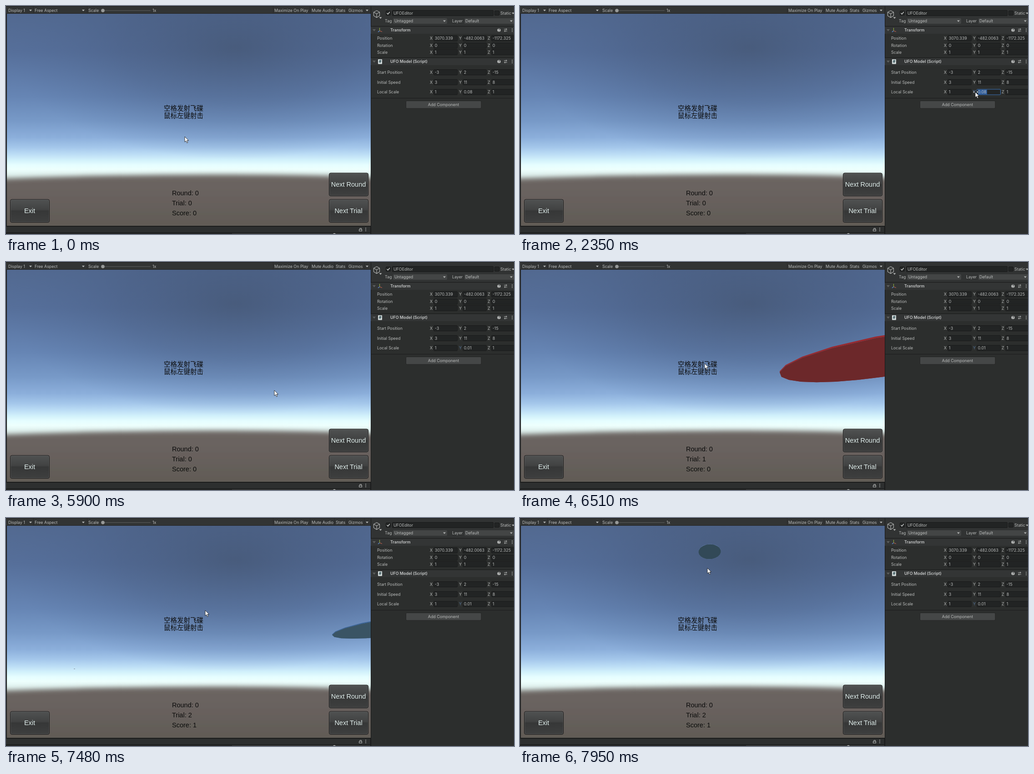
These frames come from a looping animation (1117 px wide and 501 px high, 8000 ms). An HTML page:

```html
<!DOCTYPE html>
<html lang="zh-CN">
<head>
<meta charset="utf-8">
<title>Disc launcher</title>
<style>
html, body { margin: 0; width: 100%; height: 100%; overflow: hidden; background: #2c2e2d; }
svg { display: block; width: 1117px; height: 501px; }
text { white-space: pre; }
.ui { font: 8.9px Inter, Roboto, sans-serif; fill: #b9bbba; }
.bold { font-weight: 600; fill: #c8caca; }
.game { font: 14.5px "Liberation Sans", Arial, sans-serif; fill: #0b0b0b; }
.cjk { font: 14.5px "Noto Sans CJK SC", "Noto Sans CJK", sans-serif; fill: #0b0b0b; }
.btn { fill: #e2f0ee; text-anchor: middle; }
</style>
</head>
<body>
<svg id="stage" viewBox="0 0 1117 501" xmlns="http://www.w3.org/2000/svg">
  <defs>
    <linearGradient id="sky" gradientUnits="userSpaceOnUse" x1="0" y1="17" x2="0" y2="395">
      <stop offset="0" stop-color="#526990"/><stop offset=".22" stop-color="#566f9a"/>
      <stop offset=".48" stop-color="#6685b4"/><stop offset=".62" stop-color="#7799c7"/>
      <stop offset=".72" stop-color="#8cafdb"/><stop offset=".775" stop-color="#a3c6ea"/>
      <stop offset=".815" stop-color="#bbdcf5"/><stop offset=".85" stop-color="#d2f1fb"/>
      <stop offset=".88" stop-color="#e6feff"/><stop offset=".905" stop-color="#edfffd"/>
      <stop offset="1" stop-color="#c6d6d2"/>
    </linearGradient>
    <radialGradient id="dusk" gradientUnits="userSpaceOnUse" cx="0" cy="0" r="1"
      gradientTransform="translate(505 92) scale(500 245)">
      <stop offset="0" stop-color="#42536f" stop-opacity=".68"/>
      <stop offset=".5" stop-color="#465a7e" stop-opacity=".4"/>
      <stop offset="1" stop-color="#4e6894" stop-opacity="0"/>
    </radialGradient>
    <linearGradient id="ground" gradientUnits="userSpaceOnUse" x1="0" y1="370" x2="0" y2="483">
      <stop offset="0" stop-color="#6d6663"/><stop offset="1" stop-color="#615b56"/>
    </linearGradient>
    <linearGradient id="key" x1="0" y1="0" x2="0" y2="1">
      <stop offset="0" stop-color="#505252"/><stop offset=".45" stop-color="#414242"/>
      <stop offset=".5" stop-color="#363737"/><stop offset="1" stop-color="#3e3f3f"/>
    </linearGradient>
    <filter id="soft" x="-10%" y="-20%" width="120%" height="140%"><feGaussianBlur stdDeviation="5.5"/></filter>
    <clipPath id="view"><rect x="2" y="17" width="800" height="466"/></clipPath>
  </defs>
  <g id="scene" clip-path="url(#view)">
    <rect x="2" y="17" width="800" height="466" fill="url(#sky)"/>
    <rect x="2" y="17" width="800" height="466" fill="url(#dusk)"/>
    <path d="M-40 381Q200 371 450 370.500T850 380V520H-40Z" fill="url(#ground)" filter="url(#soft)"/>
    <rect id="speck" x="149" y="331" width="3" height="1" fill="#54505c" opacity=".6"/>
    <g id="discs"></g>
  </g>
  <g id="panel"></g>
  <g id="cursor">
    <path id="arrow" d="M0 0V11.8L2.8 9.3 4.8 13.9 6.8 13 4.8 8.6H8.5Z" fill="#fff" stroke="#111" stroke-width=".8"/>
    <path id="beam" d="M-3 -6.5H-.8L0 -6L.8 -6.5H3M0 -6V6M-3 6.5H-.8L0 6L.8 6.5H3" fill="none" stroke="#ddd"/>
    <path id="grip" d="M-2 -2.5V2.5L-5 0ZM4 -2.5V2.5L7 0Z" fill="#fff" stroke="#111" stroke-width=".6"/>
  </g>
</svg>
<script>
const $ = id => document.getElementById(id);
const rect = (x, y, w, h, fill, more = '') =>
  `<rect x="${x}" y="${y}" width="${w}" height="${h}" fill="${fill}" ${more}/>`;
const text = (x, y, s, cls = 'ui', more = '') => `<text x="${x}" y="${y}" class="${cls}" ${more}>${s}</text>`;
const path = (d, fill, more = '') => `<path d="${d}" fill="${fill}" ${more}/>`;
const down = (x, y) => path(`M${x - 3} ${y - 1.5}h6l-3 3.5z`, '#b4b6b5');
const dots = (x, y) => [-3, 0, 3].map(d => rect(x - .7, y + d - .7, 1.5, 1.5, '#c0c2c1')).join('');
const field = (x, y, w, h = 12, more = '') =>
  rect(x + .5, y + .5, w - 1, h, '#222424', `stroke="#191a1a" rx="1.5" ${more}`);

function gameButton(x, y, label) {
  return rect(x + .5, y, 86, 50.5, 'url(#key)', 'stroke="#161616" rx="3.5"') +
    rect(x + 1.5, y + 1, 84, 48.5, 'none', 'stroke="#6a6c6c" stroke-opacity=".45" rx="2.5"') +
    text(x + 43, y + 30.3, label, 'game btn');
}

function header(y, label) {
  const c = y + 7.5;
  return rect(802, y - 1.5, 315, 1.2, '#1b1c1c') + rect(802, y, 315, 15.5, '#333535') +
    path(`M806 ${c - 2}h7l-3.5 4.5z`, '#5c5e5e') + text(845, c + 3, label, 'ui bold') +
    `<circle cx="1084" cy="${c}" r="3.6" fill="#c0c2c1"/>` +
    text(1082.2, c + 2.6, '?', 'ui', 'style="font-size:7px;font-weight:700;fill:#333535"') +
    path(`M1095 ${c - 2}h7M1095 ${c + 2}h7M1100 ${c - 4}v4M1097 ${c}v4`, 'none', 'stroke="#b4b6b5"') +
    dots(1113, c);
}

function vectorRow(y, label, values, ids = []) {
  return text(816, y + 3.2, label) + values.map((v, i) => {
    const x = [940, 1004, 1067][i];
    return text(x - 8, y + 3.2, 'XYZ'[i], 'ui', ids[i] ? 'id="axis"' : '') +
      field(x, y - 6.5, 53, 12, ids[i] ? 'id="box"' : '') +
      (ids[i] ? rect(1007, y - 5, 20, 10.5, '#2e5d9e', 'id="mark"') : '') +
      text(x + 2.7, y + 3.2, v, 'ui', ids[i] ? 'id="value"' : '') +
      (ids[i] ? rect(1026, y - 5, 1, 10.5, '#d5d7d6', 'id="caret"') : '');
  }).join('');
}

$('panel').innerHTML =
  // toolbar and bottom strip
  rect(0, 0, 802, 17, '#323434') + rect(0, 0, 802, 1, '#1c1d1d') + rect(0, 16, 802, 1, '#232424') +
  rect(0, 17, 2, 484, '#1e1f1f') +
  text(5, 13, 'Display 1') + down(54, 9.5) + text(63, 13, 'Free Aspect') + down(170, 9.5) +
  text(181, 13, 'Scale') + rect(212, 9.5, 106, 1, '#606262') + '<circle cx="213" cy="10" r="3.8" fill="#989a99"/>' +
  text(322, 13, '1x') + text(590, 13, 'Maximize On Play') + text(672, 13, 'Mute Audio') +
  text(725, 13, 'Stats') + text(753, 13, 'Gizmos') + down(794, 9.5) +
  [60, 178, 587, 668, 722, 749, 788].map(x => rect(x, 1, 1, 15, '#292a2a')).join('') +
  rect(0, 483, 802, 18, '#1b1c1c') + rect(0, 485, 801, 12.5, '#2d2f2f') +
  rect(2, 499, 495, 2, '#252626') + rect(497, 499, 304, 2, '#363838') +
  '<circle cx="722" cy="502" r="3" fill="#a0a2a1"/>' +
  rect(776.5, 491, 6, 3.5, 'none', 'stroke="#b4b6b5"') + path('M778 491v-2.5h3.5v2.5', 'none', 'stroke="#b4b6b5"') + dots(791, 491) +
  // game interface
  text(347, 229.6, '空格发射飞碟', 'cjk') + text(347, 246.4, '鼠标左键射击', 'cjk') +
  text(365, 416.3, 'Round: 0', 'game') + text(365, 438, '', 'game', 'id="trial"') +
  text(365, 459.7, '', 'game', 'id="score"') +
  gameButton(9, 425, 'Exit') + gameButton(710, 367, 'Next Round') + gameButton(710, 425, 'Next Trial') +
  // inspector
  rect(802, 0, 315, 501, '#2c2e2d') + rect(802, 0, 1, 501, '#181919') +
  rect(803, 0, 314, 44, '#313333') + rect(802, 0, 315, 1, '#1c1d1d') +
  path('M815 10l6.5 3.5v8l-6.5 3.8l-6.5 -3.8v-8zM808.5 13.5l6.5 3.7l6.5 -3.7M815 17.2v8', 'none', 'stroke="#b4b6b5" stroke-width="1.1"') +
  down(823.5, 26) +
  field(835, 10, 11, 10) + path('M837.5 15.5l2.3 2.5l4 -5', 'none', 'stroke="#d8dad9" stroke-width="1.3"') +
  field(849, 9, 223) + text(852, 19, 'UFOEditor') +
  field(1074, 10, 11, 10) + text(1087, 19, 'Static') + down(1115, 16) +
  text(833, 36.2, 'Tag') + rect(851, 27, 119, 12, '#434545', 'rx="2"') + text(854, 36.2, 'Untagged') + down(964, 33) +
  text(981, 36.2, 'Layer') + rect(1008, 27, 112, 12, '#434545', 'rx="2"') + text(1010, 36.2, 'Default') + down(1111, 33) +
  header(45.5, 'Transform') +
  path('M821.5 48v6.5', 'none', 'stroke="#8fb040" stroke-width="1.2"') +
  path('M821.5 54.5l-3.5 2.5', 'none', 'stroke="#5b8fdc" stroke-width="1.4"') +
  path('M821.5 54.5l5.5 2', 'none', 'stroke="#c06450" stroke-width="1.2"') +
  vectorRow(71, 'Position', ['3070.339', '-482.0063', '-1172.325']) +
  vectorRow(87, 'Rotation', [0, 0, 0]) + vectorRow(101.3, 'Scale', [1, 1, 1]) +
  header(114.5, 'UFO Model (Script)') +
  rect(818, 117, 9, 10.5, '#d4dcdc', 'rx="1"') + text(819.7, 125.3, '#', 'ui', 'style="fill:#2d4a50;font-weight:700"') +
  vectorRow(145.7, 'Start Position', [-3, 2, -15]) + vectorRow(167.3, 'Initial Speed', [3, 11, 8]) +
  vectorRow(189, 'Local Scale', [1, '0.08', 1], [0, 1, 0]) +
  rect(802, 202, 315, 1, '#1b1c1c') +
  rect(879.5, 208.5, 165.5, 16.5, '#454747', 'stroke="#242525" rx="2"') +
  text(962, 220, 'Add Component', 'ui', 'text-anchor="middle"');

// Spans of screen updates: start, end, intervals.
const spans = [[210, 300, 1], [580, 1370, 16], [1420, 1421, 1], [1600, 2040, 8], [2310, 2350, 1],
  [5140, 5680, 10], [5860, 6040, 4], [6240, 6510, 6], [6510, 6800, 6], [6800, 7480, 15], [7480, 7950, 10]];

function snap(t) {
  const span = spans.filter(s => s[0] <= t).pop();
  if (!span) return 0;
  const [a, b, n] = span;
  return t >= b ? b : a + Math.floor((t - a) / (b - a) * n + 1e-6) * (b - a) / n;
}

const pointer = [[0, 393, 287], [300, 394, 289], [580, 398, 290], [850, 640, 215], [1080, 890, 160], [1370, 1040, 191],
  [1421, 1031, 191], [1600, 1020, 190], [1765, 706, 402], [1930, 960, 124], [2040, 1000, 182], [2310, 1000, 184],
  [2350, 1001, 189], [5140, 993, 192], [5400, 760, 245], [5680, 600, 284], [5860, 590, 282], [6040, 488, 281],
  [6240, 478, 276], [6510, 406, 223], [6800, 441, 167], [6900, 443, 160], [7150, 440, 190], [7480, 438, 203], [7950, 412, 110]];

function pointerAt(t) {
  // The hand rests between the drag click and leaving the field.
  if (t >= 2350 && t < 5140) return [1001, 189];
  const i = Math.max(1, pointer.findIndex(p => p[0] >= t));
  const [t0, x0, y0] = pointer[i - 1], [t1, x1, y1] = pointer[i];
  const k = (t - t0) / (t1 - t0);
  return [x0 + (x1 - x0) * k, y0 + (y1 - y0) * k];
}

const PITCH = 14 * Math.PI / 180, COS = Math.cos(PITCH), SIN = Math.sin(PITCH), FOCAL = 403, SIDES = 20;

function project(x, y, z) {
  const depth = z * COS + y * SIN;
  return [401 + FOCAL * x / depth, 250 - FOCAL * (y * COS - z * SIN) / depth, depth];
}

const outline = pts => 'M' + pts.map(p => p[0].toFixed(2) + ' ' + p[1].toFixed(2)).join('L') + 'Z';

// A flat horizontal cylinder seen from below.
function disc([x, y, z], r, rim, face) {
  const ring = h => Array.from({ length: SIDES }, (_, i) => {
    const a = i / SIDES * 2 * Math.PI;
    return project(x + r * Math.cos(a), y + h, z + r * Math.sin(a));
  });
  const low = ring(0), high = ring(r * .014);
  if (Math.min(...low.map(p => p[2])) < .1) return '';
  const walls = low.map((p, i) => {
    const j = (i + 1) % SIDES;
    return outline([p, low[j], high[j], high[i]]);
  }).join('');
  return path(walls, rim) + path(outline(low), face);
}

const flight = (p, v, s) => [p[0] + v[0] * s, p[1] + v[1] * s - 4.9 * s * s, p[2] + v[2] * s];
const HIT = 6890;

function drawDiscs(t) {
  let out = '';
  if (t >= 6400 && t < 7300) {
    let pos = flight([2.035, .678, 2.21], [-2.6, 7.33, 7.76], (Math.min(t, HIT) - 6510) / 1000);
    if (t > HIT) {
      const far = (t - HIT) * .43;
      pos = pos.map((c, i) => c + [-.623, .048, 1.018][i] * far);
    }
    const k = Math.min(1, Math.max(0, (pos[2] - 2.2) / 2.2));
    out += disc(pos, .985, `hsl(357 ${58 + 20 * k}% ${38 + 22 * k}%)`, `hsl(358 ${46 + 6 * k}% ${29 - 4 * k}%)`);
  }
  if (t >= 7380) {
    const s = (t - 7480) / 1000, k = Math.min(1, Math.max(0, s / .47));
    out += disc(flight([1.476, .34, 1.26], [-2.64, 9.92, 8.2], s), .36,
      `hsl(213 ${46 + 14 * k}% ${40 + 28 * k}%)`, `hsl(203 27% ${31 - 4 * k}%)`);
  }
  $('discs').innerHTML = out;
}

const show = (id, on) => $(id).setAttribute('visibility', on ? 'visible' : 'hidden');

function draw(t) {
  const T = snap(t);
  drawDiscs(T);
  show('speck', T >= 7070 && t < 7910);

  $('trial').textContent = 'Trial: ' + (t < 6280 ? 0 : t < 7260 ? 1 : 2);
  $('score').textContent = 'Score: ' + (t < HIT ? 0 : 1);

  const focus = t >= 1600 && t < 5560, hover = t >= 1350 && t < 1600;
  const typed = t < 2970 ? '0.08' : '0.01'.slice(0, t < 3150 ? 1 : t < 3340 ? 2 : t < 4640 ? 3 : 4);
  $('value').textContent = typed;
  $('box').setAttribute('stroke', focus ? '#3a72b8' : hover ? '#626464' : '#191a1a');
  $('axis').style.fill = focus ? '#6d9fe8' : t >= 5560 ? '#59769c' : '';
  show('mark', t >= 1655 && t < 2970);
  show('caret', t >= 2970 && t < 5560);
  $('caret').setAttribute('x', [1012, 1015, 1020, 1025.5][typed.length - 1]);

  const [x, y] = pointerAt(T);
  const beam = t >= 1370 && t < 1655, grip = t >= 2310 && t < 5140;
  $('cursor').setAttribute('transform', `translate(${x.toFixed(1)} ${y.toFixed(1)})`);
  show('beam', beam);
  show('arrow', !beam);
  show('grip', grip);
}

function tick() {
  draw(performance.now() % 8000);
  requestAnimationFrame(tick);
}
tick();
</script>
</body>
</html>
```
